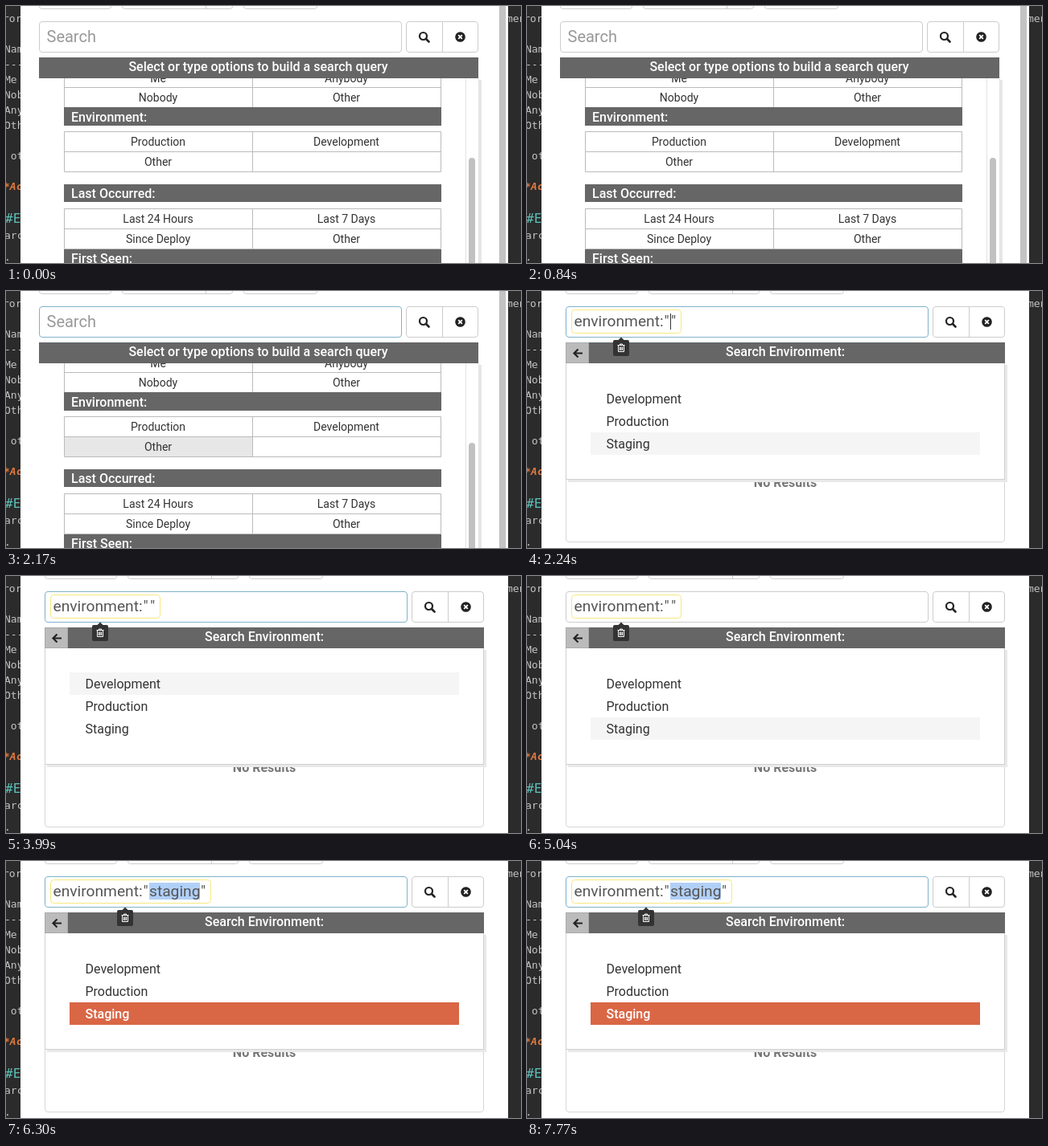
Recreate the animation shown at these times as an HTML page. Size 640 px wide and 320 px high, loop 7.84 s.

```html
<!DOCTYPE html>
<html lang="en">
<head>
<meta charset="utf-8">
<title>Search query builder</title>
<style>
html, body { margin: 0; width: 100%; height: 100%; overflow: hidden; background: #2b2b2b; }
svg { display: block; width: 640px; height: 320px; font: 14px Roboto, sans-serif; fill: #333; }
text { white-space: pre; }
.code { font: 13px "DejaVu Sans Mono", monospace; fill: #c4c4c4; }
.mid { text-anchor: middle; }
.head { font-size: 16px; font-weight: 500; fill: #fff; }
.item { font-size: 16px; }
.query { font-size: 19.2px; fill: #555; }
.line { fill: none; stroke: #ccc; }
.grid { fill: none; stroke: #bbb; }
.bar { fill: #666; }

/* one loop, 7.84 s */
.top, .browse, .detail, .hover, .field, .caret, .empty, .chosen, .dev, .prod, .stag {
  animation: 7.84s step-end infinite;
}
.top { animation-name: shift; }
.browse { animation-name: browse; }
.detail { animation-name: detail; }
.hover { animation-name: hover; }
.field { animation-name: focus; animation-timing-function: linear; }
.caret { animation-name: caret; }
.empty { animation-name: empty; }
.chosen { animation-name: chosen; }
.dev { animation-name: dev; }
.prod { animation-name: prod; }
.stag { animation-name: stag; }

@keyframes shift { 0% { transform: none } 28.571%, 100% { transform: translateX(7px) } }
@keyframes browse { 0% { opacity: 1 } 28.571%, 100% { opacity: 0 } }
@keyframes detail { 0% { opacity: 0 } 28.571%, 100% { opacity: 1 } }
@keyframes hover { 0% { opacity: 0 } 11.607%, 100% { opacity: 1 } }
@keyframes focus {
  0%, 16.964% { stroke: #ccc }
  19.643%, 61.607% { stroke: #7fb2cb }
  63.393%, 67.857% { stroke: #ccc }
  70.536%, 100% { stroke: #7fb2cb }
}
@keyframes caret {
  0% { opacity: 1 } 34.949% { opacity: 0 } 41.327% { opacity: 1 }
  47.704% { opacity: 0 } 54.082% { opacity: 1 } 60.459%, 100% { opacity: 0 }
}
@keyframes empty { 0% { opacity: 1 } 67.857%, 100% { opacity: 0 } }
@keyframes chosen { 0% { opacity: 0 } 67.857%, 100% { opacity: 1 } }
@keyframes dev { 0% { opacity: 0 } 33.929% { opacity: 1 } 60.714%, 100% { opacity: 0 } }
@keyframes prod {
  0% { opacity: 0 } 33.036% { opacity: 1 } 33.929% { opacity: 0 }
  60.714% { opacity: 1 } 61.607%, 100% { opacity: 0 }
}
@keyframes stag { 0% { opacity: 1 } 33.036% { opacity: 0 } 61.607%, 100% { opacity: 1 } }
</style>
</head>
<body>
<svg viewBox="0 0 640 320">
  <defs>
    <g id="trash">
      <path d="M-3.5 0 0-3.5 3.500 0H8q2 0 2 2V18q0 2-2 2H-8q-2 0-2-2V2q0-2 2-2Z" fill="#333"/>
      <path d="M-4.500 6.500H4.500M-1.500 6V5H1.500V6M-3.500 7V14.500H3.500V7M-1.500 8.500V13M0 8.500V13M1.500 8.500V13" fill="none" stroke="#fff"/>
    </g>
  </defs>

  <rect width="640" height="320" fill="#2b2b2b"/>
  <g class="code">
    <text x="-4" y="20">ror</text>
    <text x="-2" y="58">Nam</text>
    <text x="-2" y="77">---</text>
    <text x="-2" y="96">Me</text>
    <text x="-2" y="115">Nob</text>
    <text x="-2" y="134">Any</text>
    <text x="-2" y="153">Oth</text>
    <text x="-2" y="191"> ot</text>
    <text x="-3" y="229" fill="#e0793f" font-weight="bold" font-style="italic">*Ac</text>
    <text x="-1" y="270" fill="#5cc0b8" font-size="16">#E</text>
    <text x="-2" y="290">arc</text>
    <text x="-2" y="322">:</text>
    <text x="622" y="20">men</text>
  </g>
  <rect x="18" width="606" height="320" fill="#fff"/>

  <g class="browse">
    <rect x="612" width="12" height="320" fill="#f7f7f7"/>
    <rect x="613" width="8" height="320" fill="#c3c3c3"/>
    <rect x="587" y="92" width="4" height="228" fill="#e6e6e6"/>
    <path class="line" d="M587.500 90V320M571.500 90V320" style="stroke:#e2e2e2"/>
    <rect x="575" y="189" width="8" height="140" rx="4" fill="#c1c1c1"/>
    <rect class="hover" x="73" y="182" width="233" height="25" fill="#e7e7e7"/>
    <path class="grid" d="M72.500 88V126M540.500 88V126M306.500 88V126M72 101.500H541
      M72.500 156.500H540.500V206.500H72.500ZM72 181.500H541M306.500 156V207
      M72.500 252.500H540.500V302.500H72.500ZM72 277.500H541M306.500 252V303"/>
    <path class="bar" d="M72 126H541V149H72ZM72 222H541V244H72ZM72 303H541V320H72Z"/>
    <g class="head">
      <text x="81" y="144">Environment:</text>
      <text x="81" y="239">Last Occurred:</text>
      <text x="81" y="320">First Seen:</text>
    </g>
    <g class="mid">
      <text x="189" y="95">Me</text><text x="423" y="95">Anybody</text>
      <text x="189" y="119">Nobody</text><text x="423" y="119">Other</text>
      <text x="189" y="174">Production</text><text x="423" y="174">Development</text>
      <text x="189" y="199">Other</text>
      <text x="189" y="270">Last 24 Hours</text><text x="423" y="270">Last 7 Days</text>
      <text x="189" y="295">Since Deploy</text><text x="423" y="295">Other</text>
    </g>
    <rect class="bar" x="41" y="64" width="546" height="26"/>
    <text class="head mid" x="313.500" y="81">Select or type options to build a search query</text>
  </g>

  <g class="top">
    <path class="line" d="M41.500-9V.5q0 3 3 3H127.500q3 0 3-3V-9M144.500-9V.5q0 3 3 3H278.500q3 0 3-3V-9M248.500-9V3.500M295.500-9V.5q0 3 3 3H383.500q3 0 3-3V-9"/>
    <rect class="line field" x="41.500" y="19.500" width="450" height="38" rx="3.500"/>
    <rect class="line" x="497.500" y="19.500" width="89" height="38" rx="3.500"/>
    <path class="line" d="M542.500 20V57"/>
    <circle cx="518.500" cy="37.500" r="4.500" fill="none" stroke="#222" stroke-width="2.200"/>
    <path d="M522 41 525.500 44.500" stroke="#222" stroke-width="2.600" stroke-linecap="round"/>
    <circle cx="564.500" cy="38.500" r="6.300" fill="#222"/>
    <path d="M562.200 36.200 566.800 40.800M566.800 36.200 562.200 40.800" stroke="#fff" stroke-width="1.900"/>
  </g>
  <text class="browse" x="50.500" y="44.500" style="font-size:20px;fill:#999">Search</text>

  <g class="detail">
    <path class="line" d="M48.500 230V309q0 3.500 3.500 3.500H590q3.500 0 3.500-3.500V230" style="stroke:#d6d6d6"/>
    <text class="mid" x="321" y="244" style="font-size:16px;font-weight:700;fill:#777">No Results</text>
    <path d="M51 92H597V238H51Z" fill="#e9e9e9"/>
    <rect x="48.500" y="64.500" width="545" height="170" fill="#fff" stroke="#d0d0d0"/>
    <rect class="bar" x="48" y="64" width="546" height="26"/>
    <rect x="48.500" y="64.500" width="28" height="25" fill="#bbb" stroke="#aaa"/>
    <path d="M69 77.500H59M63.500 72.500 58.500 77.500 63.500 82.500" fill="none" stroke="#222" stroke-width="2.200"/>
    <text class="head mid" x="321" y="81">Search Environment:</text>

    <g fill="#f5f5f5">
      <rect class="dev" x="79" y="120" width="484" height="28"/>
      <rect class="prod" x="79" y="148" width="484" height="28"/>
      <rect class="stag" x="79" y="176" width="484" height="28"/>
    </g>
    <g class="item">
      <text x="98.500" y="140">Development</text>
      <text x="98.500" y="168">Production</text>
      <text class="empty" x="98.500" y="196">Staging</text>
    </g>

    <g class="empty">
      <rect x="55.500" y="23.500" width="136" height="29" rx="4" fill="#fff" stroke="#f6e87f"/>
      <text class="query" x="179" y="44">"</text>
      <path class="caret" d="M178.500 28V48" stroke="#333"/>
      <use href="#trash" x="117" y="61"/>
    </g>
    <g class="chosen">
      <rect x="55.500" y="23.500" width="199" height="29" rx="4" fill="#fff" stroke="#f6e87f"/>
      <rect x="178" y="27" width="63" height="21" fill="#b1d0f8"/>
      <text class="query" x="178" y="44">staging</text>
      <text class="query" x="242" y="44">"</text>
      <use href="#trash" x="148" y="61"/>
      <rect x="79" y="176" width="484" height="28" fill="#d96645"/>
      <text class="head" x="98.500" y="196">Staging</text>
    </g>
    <text class="query" x="58.500" y="44">environment:</text>
    <text class="query" x="170.500" y="44">"</text>
  </g>
</svg>
</body>
</html>
```
